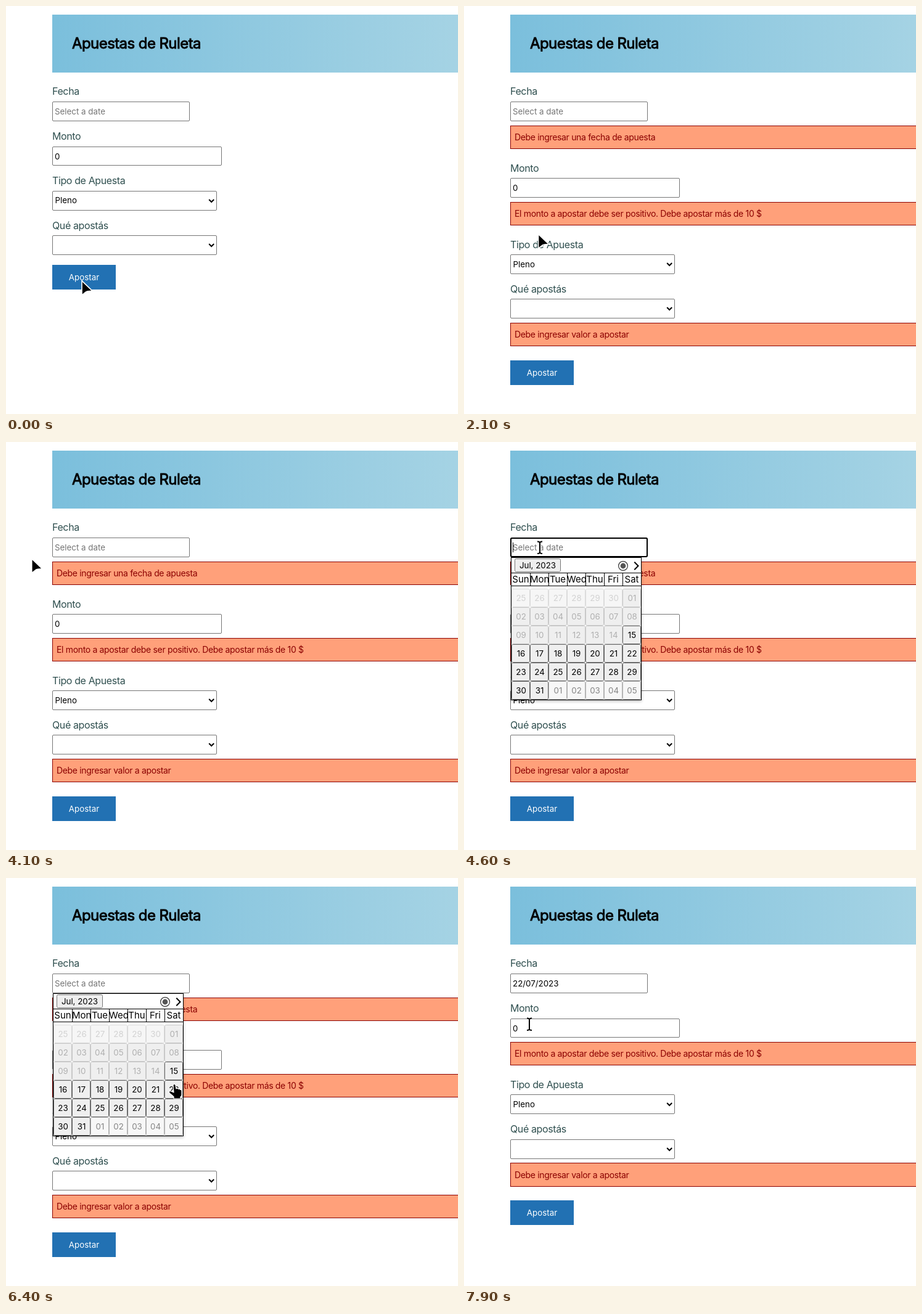
Write an HTML page that moves like this. It is 733 px wide and 662 px high and loops after 8000 ms.

```html
<!DOCTYPE html>
<html lang="es">
<head>
<meta charset="utf-8">
<title>Apuestas de Ruleta</title>
<style>
  html, body { margin: 0; width: 100%; height: 100%; overflow: hidden; background: #fff; }
  svg { display: block; width: 733px; height: 662px; }
  text { font: 13.333px Inter, sans-serif; font-optical-sizing: none; white-space: pre; }
  .title { font-size: 24px; letter-spacing: -.024em; stroke: #000; stroke-width: .88px; }
  .label { font-size: 16px; letter-spacing: -.024em; fill: #2f4f4f; }
  .error { font-size: 14px; letter-spacing: -.024em; fill: #8b0000; }
  .week { font-size: 15px; }
  .mid { text-anchor: middle; }
  .picker { filter: drop-shadow(0 2px 2px rgba(0, 0, 0, .25)); }
</style>
</head>
<body>
<svg id="stage" viewBox="0 0 733 662"></svg>
<script>
const stage = document.getElementById('stage');
const LOOP = 8000, STEP = 100;
const ERROR_SHIFT = 51.6; // height an error message adds to the form

// time, x, y, pointer shape
const path = [
  [0, 122, 444, 'arrow'], [2000, 122, 444, 'arrow'], [2400, 112, 141, 'arrow'],
  [2600, 112, 141, 'arrow'], [2700, 115, 200, 'arrow'], [2900, 139, 500, 'arrow'],
  [3200, 427, 530, 'arrow'], [3500, 286, 545, 'arrow'], [3700, 16, 192, 'arrow'],
  [4000, 16, 192, 'arrow'], [4400, 115, 174, 'beam'], [4600, 123, 171, 'beam'],
  [4800, 123, 171, 'beam'], [5000, 145, 250, 'hand'], [5300, 215, 354, 'hand'],
  [5700, 274, 348, 'hand'], [6100, 268, 342, 'hand'], [6400, 274, 335, 'hand'],
  [6500, 268, 321, 'arrow'], [6700, 268, 321, 'arrow'], [6900, 122, 603, 'arrow'],
  [7000, 122, 603, 'arrow'], [7200, 124, 588, 'arrow'], [7700, 124, 588, 'arrow'],
  [7800, 115, 362, 'arrow'], [7900, 106, 237, 'beam'], [LOOP, 106, 237, 'beam']
];

const pointers = {
  arrow: '<path d="M1 1.8V25.2L8 19.6Q9.2 18.6 18 18.2Z" stroke="#fff" stroke-width="1.6" stroke-linejoin="round"/>',
  beam: ['#fff" stroke-width="4', '#000" stroke-width="2'].map(s =>
    `<path d="M-4 -9.5Q0 -9.5 0 -7V7.5Q0 10 -4 10M4 -9.5Q0 -9.5 0 -7V7.5Q0 10 4 10" fill="none" stroke="${s}"/>`).join(''),
  hand: '<path d="M-3 1Q-1 -2 1 1L2 7Q4 5 5.5 7.5Q7.5 6 8.5 8.5Q11 7.5 11 11V17Q11 19 9 20V23H-2V20Q-5 17 -9 14Q-10.5 11 -7.5 10.5L-2 13Z" stroke="#fff" stroke-width="1.2" stroke-linejoin="round"/>'
};

const text = (x, y, s, cls = '', fill = '') =>
  `<text x="${x}" y="${y}" class="${cls}"${fill && ` fill="${fill}"`}>${s}</text>`;

const box = (x, y, w, h, fill, stroke, r = 0) =>
  `<rect x="${x + .5}" y="${y + .5}" width="${w - 1}" height="${h - 1}" rx="${r}" fill="${fill}" stroke="${stroke}"/>`;

function field(top, bottom, width, hover) {
  const y = Math.round(top);
  return box(75, y, width, Math.round(bottom) - y, '#fff', hover ? '#4f4f4f' : '#767676', 1.5);
}

function select(top, bottom, hover) {
  const mid = Math.round((top + bottom) / 2);
  return field(top, bottom, 267, hover) +
    `<path d="M329.2 ${mid - 2}l4 4 4 -4" fill="none" stroke="#000" stroke-width="2"/>`;
}

function error(top, bottom, message) {
  const y = Math.round(top), end = Math.round(bottom);
  return box(75, y, 670, end - y, '#ffa07a', '#8b0000') + text(82, end - 14, message, 'error');
}

function day(i) {
  const x = 77 + i % 7 * 30, y = 238 + Math.floor(i / 7) * 30;
  const n = i < 6 ? 25 + i : (i - 6) % 31 + 1;
  const [ink, fill, edge] =
    i < 6 ? ['#d2d2d2', '#f6f6f6', '#dcdcdc'] :
    i < 20 ? ['#b0b0b0', '#efefef', '#c8c8c8'] :
    i < 37 ? ['#000', '#efefef', '#6b6b6b'] : ['#858585', '#f7f7f7', '#b4b4b4'];
  return box(x, y, 30, 30, fill, edge, 2) +
    text(x + 15.5, y + 20, String(n).padStart(2, '0'), 'mid', ink);
}

function calendar() {
  const names = ['Sun', 'Mon', 'Tue', 'Wed', 'Thu', 'Fri', 'Sat'];
  let out = '<g class="picker">' + box(76, 187, 212, 232, '#fff', '#000') + '</g>';
  out += box(82, 189, 75, 22, '#efefef', '#767676', 2) + text(119.5, 205, 'Jul, 2023', 'mid');
  out += '<circle cx="258" cy="201" r="7.4" fill="none" stroke="#333" stroke-width="1.2"/>' +
    '<circle cx="258" cy="201" r="4.4" fill="#555"/>' +
    '<path d="M276.3 194.8l6.2 6.2 -6.2 6.2" fill="none" stroke="#000" stroke-width="2"/>';
  names.forEach((name, i) => {
    const x = 77 + i * 30, wide = i === 1 || i === 3;
    out += `<svg x="${x}" y="212" width="30" height="22">` +
      text(wide ? 0 : 15, 16, name, wide ? 'week' : 'week mid') + '</svg>';
    if (i) out += `<path d="M${x + .5} 212V233" stroke="#000"/>`;
  });
  out += '<path d="M76 212.5H288M76 233.5H288" stroke="#000"/>';
  for (let i = 0; i < 42; i++) out += day(i);
  return out;
}

function pointer(t) {
  const i = Math.max(1, path.findIndex(p => p[0] > t));
  const [t0, x0, y0, shape] = path[i - 1], [t1, x1, y1] = path[i];
  const k = (t - t0) / (t1 - t0);
  return `<g transform="translate(${x0 + (x1 - x0) * k} ${y0 + (y1 - y0) * k})">${pointers[shape]}</g>`;
}

function scene(t) {
  const checked = t >= 1000, dateError = checked && t < 7300;
  const picked = t >= 6500, open = t >= 4600 && !picked;
  const focused = t >= 4600 && t < 6400;
  const a = dateError ? ERROR_SHIFT : 0;
  const b = a + (checked ? ERROR_SHIFT : 0);
  const c = b + (checked ? ERROR_SHIFT : 0);
  const label = (y, s) => text(75, Math.round(y), s, 'label');

  let out = '<defs><linearGradient id="sky"><stop stop-color="#7bbfdc"/><stop offset="1" stop-color="#a5d3e4"/></linearGradient></defs>' +
    '<rect x="75" y="14" width="658" height="94" fill="url(#sky)"/>' +
    text(107, 69, 'Apuestas de Ruleta', 'title');

  out += label(144, 'Fecha') + field(155, 187, 223, t >= 2400 && t < 2700);
  out += picked ? text(79, 176, '22/07/2023') : text(79, 176, 'Select a date', '', '#757575');
  if (dateError) out += error(194, 232, 'Debe ingresar una fecha de apuesta');

  out += label(216.9 + a, 'Monto') + field(227.6 + a, 259.4 + a, 275) +
    text(79, Math.round(227.6 + a) + 21, '0');
  if (checked) out += error(266.4 + a, 304.4 + a, 'El monto a apostar debe ser positivo. Debe apostar más de 10 $');

  out += label(289.4 + b, 'Tipo de Apuesta') + select(299.7 + b, 331.8 + b, t === 7800) +
    text(79.5, Math.round(320.4 + b), 'Pleno');
  out += label(361.7 + b, 'Qué apostás') + select(372.2 + b, 404.2 + b);
  if (checked) out += error(410.8 + b, 449 + b, 'Debe ingresar valor a apostar');

  const y = Math.round(420 + c);
  out += `<rect x="75" y="${y}" width="103" height="40" fill="#2271b3"/>` +
    text(126.5, y + 25, 'Apostar', 'mid', '#fff');

  if (focused) {
    out += '<rect x="76" y="156" width="221" height="30" rx="2" fill="none" stroke="#000" stroke-width="2"/>';
    if ((t - 4600) % 1000 < 500) out += '<rect x="79" y="163" width="1" height="16"/>';
  }
  if (open) out += calendar();
  return out + pointer(t);
}

let shown = -1;
const start = performance.now();
function tick() {
  const t = Math.floor((performance.now() - start) % LOOP / STEP) * STEP;
  if (t !== shown) stage.innerHTML = scene(shown = t);
  requestAnimationFrame(tick);
}
tick();
</script>
</body>
</html>
```
